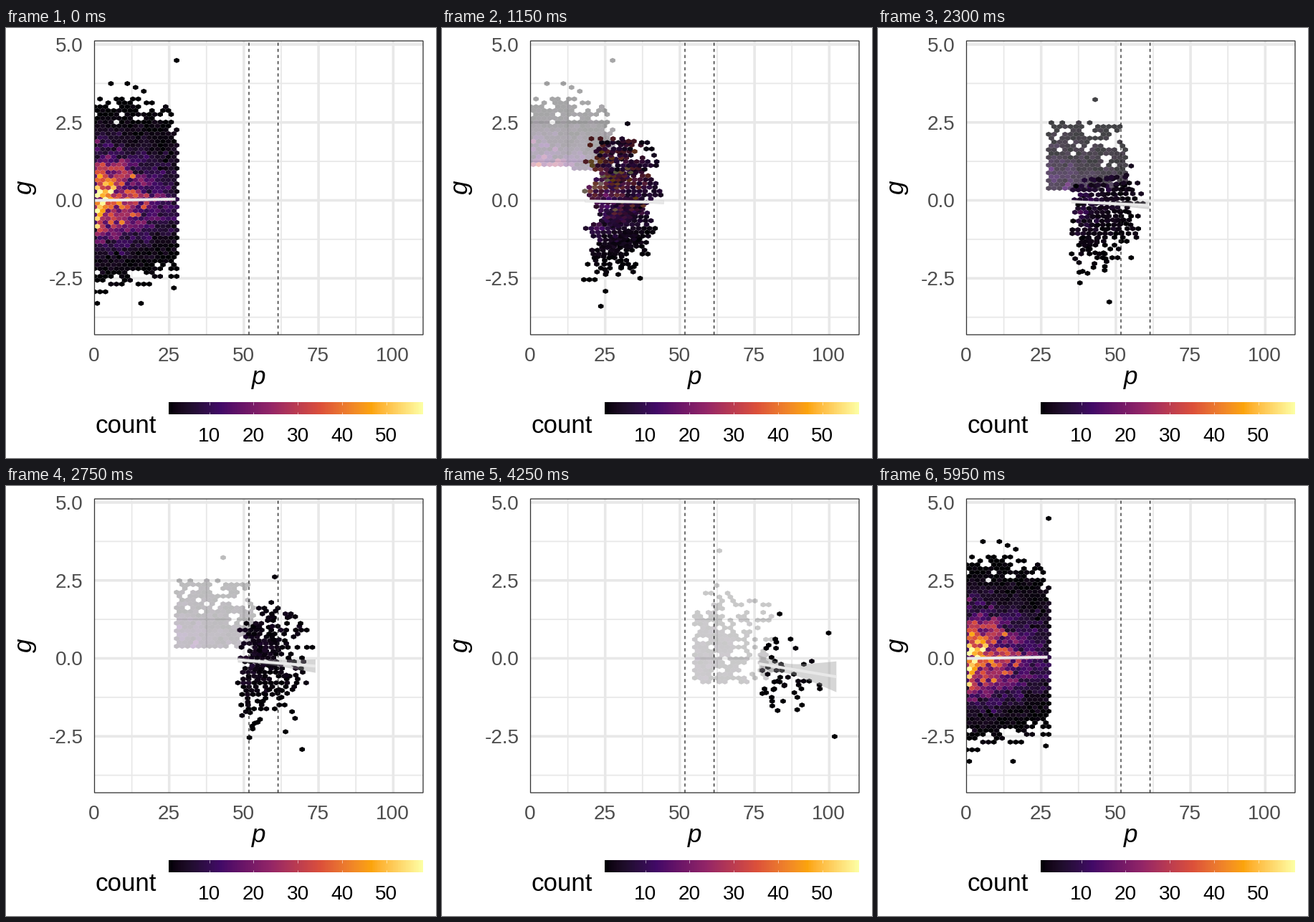
A matplotlib script for the animation above (6000 ms loop, 600 by 600 pixels).

```python
import numpy as np
import matplotlib.pyplot as plt
from matplotlib.animation import FuncAnimation
from matplotlib.collections import PolyCollection
from matplotlib.colors import ListedColormap
from matplotlib.patches import Rectangle

PX = 0.72  # points per pixel at 100 dpi
LEFT, RIGHT, TOP, BOTTOM = 123.5, 582, 18, 428
X_UNIT, Y_UNIT, Y_ZERO = 4.168, 43.5, 240.5
BIN_X, BIN_Y = 7.64, 6.213
ROW = BIN_Y * np.sqrt(3) / 2
HEX = np.array([(1, .5), (0, 1), (-1, .5), (-1, -.5), (0, -1), (1, -.5)])
HEX = HEX * (BIN_X / 2, 3.57)
GRID = "#e8e8e8"

plt.rcParams["font.family"] = "Liberation Sans"
fig = plt.figure(figsize=(6, 6), dpi=100, facecolor="white")
ax = fig.add_axes([0, 0, 1, 1])
ax.axis("off")


def lab_gradient(colors, steps=256):
    """Colour map that blends evenly spaced colours in Lab space."""
    to_xyz = np.array([[.4124, .3576, .1805], [.2126, .7152, .0722],
                       [.0193, .1192, .9505]])
    to_xyz /= to_xyz.sum(axis=1, keepdims=True)
    mix = np.array([[0, 116, 0], [500, -500, 0], [0, 200, -200]])
    lin = np.where(colors > .04045, ((colors + .055) / 1.055) ** 2.4, colors / 12.92)
    xyz = lin @ to_xyz.T
    f = np.where(xyz > .008856, np.cbrt(xyz), 7.787 * xyz + 16 / 116)
    lab = f @ mix.T
    at = np.linspace(0, len(colors) - 1, steps)
    lab = np.column_stack([np.interp(at, range(len(colors)), ch) for ch in lab.T])
    f = lab @ np.linalg.inv(mix).T
    xyz = np.where(f > .2069, f ** 3, (f - 16 / 116) / 7.787)
    lin = np.clip(xyz @ np.linalg.inv(to_xyz).T, 0, 1)
    return ListedColormap(np.where(lin > .0031308,
                                   1.055 * lin ** (1 / 2.4) - .055, 12.92 * lin))


heat = lab_gradient(plt.get_cmap("inferno")(np.linspace(0, 1, 6))[:, :3])


def px(p):
    return LEFT + X_UNIT * p


def py(g):
    return Y_ZERO - Y_UNIT * g


def build_state(base, cols, outliers, seed, total, peak, decay,
                power=1, mean=0, up=1, down=.8):
    """Hex centres and colours, ordered by row from the bottom, then by column."""
    rng = np.random.default_rng(seed)
    cells = {cell: 1 for cell in outliers}
    top = max(outliers)[0]
    drawn = []
    for r in range(3, top - 5):
        g = (r * ROW - base * BIN_Y) / Y_UNIT - mean
        spread = up if g > 0 else down
        for c in range(cols[0], cols[1] + (r % 2 == 0)):
            p = (c + r % 2 / 2 - cols[0]) * BIN_X / X_UNIT
            rate = peak * np.exp(-(p / decay) ** power - (g / spread) ** 2 / 2)
            rate *= rng.gamma(10) / 10
            if p == 0:
                rate *= .4
            drawn.append((rng.exponential() / rate, (r, c), 1 + rng.poisson(rate)))
    for _, cell, count in sorted(drawn)[:total - len(cells)]:
        cells[cell] = min(count, 58)
    order = sorted(cells)
    pos = np.array([(LEFT + (c + r % 2 / 2) * BIN_X,
                     Y_ZERO + base * BIN_Y - r * ROW) for r, c in order])
    return pos, heat(np.array([(cells[k] - 1) / 57 for k in order]))


def build_fit(x0, x1, y0, y1, h0, h1, waist):
    """Fitted line with a band that narrows to the waist."""
    s = np.linspace(0, 1, 50)
    a, b = np.sqrt(h0 ** 2 - waist ** 2), np.sqrt(h1 ** 2 - waist ** 2)
    half = np.sqrt(waist ** 2 + ((a + b) * s - a) ** 2)
    return np.array([x0 + (x1 - x0) * s, y0 + (y1 - y0) * s, half])


STATES = [
    build_state(24, (0, 15), [(1, 0), (1, 8), (58, 3), (64, 15)], seed=4,
                total=685, peak=47, decay=17, power=1.4, up=.97, down=.81),
    build_state(25, (15, 29), [(1, 19), (55, 23)], seed=9,
                total=440, peak=9, decay=16, up=1.07, down=.84),
    build_state(20, (30, 44), [(1, 44), (51, 34)], seed=12,
                total=235, peak=2.4, decay=13, mean=-.1, up=1.05, down=.78),
    build_state(18, (45, 58), [(1, 58), (37, 49)], seed=3,
                total=50, peak=.5, decay=12, mean=-.5, up=.9, down=.65),
]
FITS = [
    build_fit(124, 236.5, 240.6, 238.8, .9, 1.4, .7),
    build_fit(240, 349, 242, 245.5, 1.7, 3.2, 1.2),
    build_fit(353.5, 461.5, 242.7, 253.4, 4.5, 11.5, 3.5),
    build_fit(466, 574, 249.4, 269.6, 14, 24.2, 7.5),
]
MOVES = [(10, 30), (41, 60), (70, 89), (100, 119)]


def label(x, y, text, size=28, color="black", **kw):
    ax.text(x, y, text, fontsize=size * PX, color=color, va="baseline", **kw)


def line(xs, ys, width, color, z, **kw):
    return ax.plot(xs, ys, color=color, lw=width * PX, zorder=z,
                   solid_capstyle="butt", **kw)[0]


# Panel and axes
panel = Rectangle((LEFT, TOP), RIGHT - LEFT, BOTTOM - TOP, fill=False,
                  ec="#333333", lw=1.3 * PX, zorder=9, snap=False)
for p in np.arange(12.5, 110, 12.5):
    line([px(p)] * 2, [TOP, BOTTOM], 1.8 if p % 25 else 3.6, GRID, 1, snap=False)
for g in np.arange(-3.75, 5.1, 1.25):
    line([LEFT, RIGHT], [py(g)] * 2, 1.8 if g % 2.5 else 3.6, GRID, 1, snap=False)
for x in (339, 379.6):
    line([x] * 2, [BOTTOM, TOP], 1.3, "#222222", 5, dashes=(3.3, 3.3), snap=False)
ax.add_patch(panel)
for p in range(0, 101, 25):
    label(px(p) - .5, 465, str(p), color="#4d4d4d", ha="center")
for g in (-2.5, 0.0, 2.5, 5.0):
    label(107.5, py(g) + 10, f"{g:.1f}", color="#4d4d4d", ha="right")
label(352.5, 497.5, "p", 35, style="italic", ha="center")
label(35.5, 222.5, "g", 35, style="italic", ha="center",
      rotation=90, rotation_mode="anchor")

# Colour bar
ax.imshow(np.linspace(0, 1, 355)[None], cmap=heat, aspect="auto",
          extent=(227, 582, 539, 522), interpolation="nearest", zorder=2)
for n in range(10, 60, 10):
    x = 227 + (n - 1) * 6.18 + 1
    for y in (522, 535.5):
        line([x] * 2, [y, y + 3.5], .9, (1, 1, 1, .6), 3)
    label(x, 577, str(n), ha="center")
label(124, 565, "count", 35)

ghosts = PolyCollection([], linewidths=0, zorder=3)
movers = PolyCollection([], linewidths=0, zorder=4)
for layer in (ghosts, movers):
    ax.add_collection(layer, autolim=False)
    layer.set_clip_path(panel)
band = PolyCollection([], facecolors="#999999", alpha=.4, linewidths=0, zorder=6)
ax.add_collection(band, autolim=False)
fit_line = line([], [], 4, "#e8e8e8", 7)
ax.set_xlim(0, 600)
ax.set_ylim(600, 0)


def phase(frame):
    """Current state and progress towards the next one."""
    for k, (start, end) in enumerate(MOVES):
        if frame < end:
            return k, max(0, (frame - start) / (end - start))
    return 0, 0


def place(layer, pos, rgba):
    layer.set_verts(list(pos[:, None] + HEX))
    layer.set_facecolor(rgba)


def draw(frame):
    k, t = phase(frame)
    nxt = (k + 1) % len(STATES)
    (pos0, col0), (pos1, col1) = STATES[k], STATES[nxt]
    n = min(len(pos0), len(pos1))
    place(movers, pos0[:n] * (1 - t) + pos1[:n] * t,
          col0[:n] * (1 - t) + col1[:n] * t)

    # Cells without a partner fade in place
    if len(pos0) > n:
        rest, tint, alpha = pos0[n:], col0[n:].copy(), 1 - t
    else:
        rest, tint, alpha = pos1[n:], col1[n:].copy(), t
    tint[:, 3] = alpha
    place(ghosts, rest, tint)

    x, y, half = FITS[k] * (1 - t) + FITS[nxt] * t
    band.set_verts([np.column_stack([np.r_[x, x[::-1]],
                                     np.r_[y - half, (y + half)[::-1]]])])
    fit_line.set_data(x, y)
    return ghosts, movers, band, fit_line


anim = FuncAnimation(fig, draw, frames=120, interval=50, repeat=True,
                     repeat_delay=0, init_func=lambda: draw(0))
plt.show()
```
